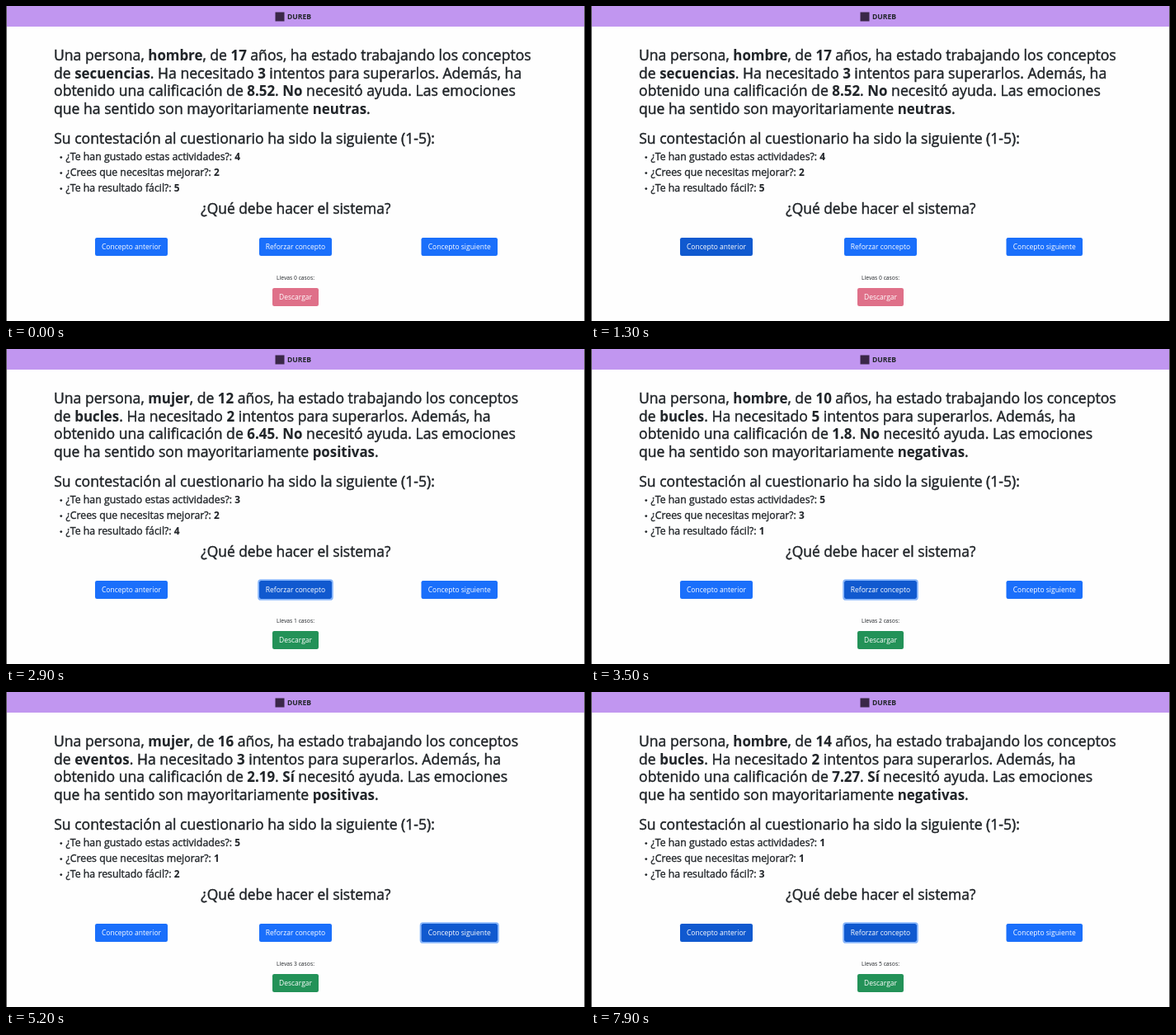
These frames come from a looping animation (702 px wide and 382 px high, 8 s). An HTML page:

```html
<!DOCTYPE html>
<html lang="es">
<head>
<meta charset="utf-8">
<style>
  html, body { margin: 0; width: 100%; height: 100%; overflow: hidden; background: #fefefe; }
  svg { display: block; width: 702px; height: 382px; }
  text { font-family: "Open Sans", "Noto Sans", sans-serif; fill: #212529; white-space: pre; }
  .big { font-size: 17.6px; stroke: #212529; stroke-width: .45px; }
  .item { font-size: 12.3px; stroke: #212529; stroke-width: .35px; }
  .bold { font-weight: 700; font-size: .96em; stroke-width: .1px; }
  .label { font-size: 8.5px; fill: #fff; text-anchor: middle; }
  .mid { text-anchor: middle; }
</style>
</head>
<body>
<svg viewBox="0 0 702 382">
  <rect width="702" height="382" fill="#fefefe"/>
  <rect width="702" height="25" fill="#c196f0"/>
  <path d="M.5 0V382M701.5 0V382" stroke="#555"/>
  <rect x="326.5" y="7.5" width="11" height="11" fill="#3a2748"/>
  <text x="341" y="16" font-size="8.6" font-weight="700">DUREB</text>
  <g id="story"></g>
  <text class="big mid" x="351.3" y="252" style="font-size: 17.4px">¿Qué debe hacer el sistema?</text>
  <g id="buttons"></g>
  <text id="count" class="mid" x="351" y="332.3" font-size="6.75"></text>
  <rect id="save" x="323" y="342" width="56" height="22" rx="2.2"/>
  <text class="label" x="351" y="356.2">Descargar</text>
</svg>
<script>
const LOOP = 8000, FADE = 150;
const $ = id => document.getElementById(id);

// start time, gender, age, concept, attempts, mark, help, emotions, answers
const cases = [
  [0, 'hombre', 17, 'secuencias', 3, 8.52, 'No', 'neutras', [4, 2, 5]],
  [2600, 'mujer', 12, 'bucles', 2, 6.45, 'No', 'positivas', [3, 2, 4]],
  [3200, 'hombre', 10, 'bucles', 5, 1.8, 'No', 'negativas', [5, 3, 1]],
  [4700, 'mujer', 16, 'eventos', 3, 2.19, 'Sí', 'positivas', [5, 1, 2]],
  [5800, 'hombre', 8, 'eventos', 1, 5.81, 'Sí', 'negativas', [3, 1, 2]],
  [7100, 'hombre', 14, 'bucles', 2, 7.27, 'Sí', 'negativas', [1, 1, 3]]
];
const questions = ['¿Te han gustado estas actividades?', '¿Crees que necesitas mejorar?', '¿Te ha resultado fácil?'];

// spans of [from, to] in ms: dark = hovered or focused, ring = focused
const buttons = [
  { name: 'Concepto anterior', x: 108, w: 88, dark: [[1100, 1700], [7600, LOOP]], ring: [] },
  { name: 'Reforzar concepto', x: 307, w: 88, dark: [[1900, 4700], [6450, LOOP]], ring: [[2600, 4700], [7100, LOOP]] },
  { name: 'Concepto siguiente', x: 503.5, w: 92.5, dark: [[4400, 7100]], ring: [[4700, 7100]] }
];
const blue = [26, 111, 251], navy = [16, 89, 207], pink = [223, 112, 137], green = [35, 146, 88];

const bold = s => `<tspan class="bold">${s}</tspan>`;
const line = (cls, x, y, s) => `<text class="${cls}" x="${x}" y="${y}">${s}</text>`;
const clamp = v => Math.max(0, Math.min(1, v));
const mix = (a, b, k) => `rgb(${a.map((v, i) => Math.round(v + (b[i] - v) * k))})`;
const level = (spans, t) => Math.max(0, ...spans.map(([from, to]) =>
  Math.min(clamp((t - from) / FADE), to === LOOP ? 1 : 1 - clamp((t - to) / FADE))));

function story([, gender, age, concept, tries, mark, help, mood, answers]) {
  const lines = [
    `Una persona, ${bold(gender)}, de ${bold(age)} años, ha estado trabajando los conceptos`,
    `de ${bold(concept)}. Ha necesitado ${bold(tries)} intento${tries > 1 ? 's' : ''} para superarlos. Además, ha`,
    `obtenido una calificación de ${bold(mark)}. ${bold(help)} necesitó ayuda. Las emociones`,
    `que ha sentido son mayoritariamente ${bold(mood)}.`
  ];
  return lines.map((s, i) => line('big', 58, 66 + 21.6 * i, s)).join('') +
    line('big', 58.2, 166.7, 'Su contestación al cuestionario ha sido la siguiente (1-5):') +
    questions.map((q, i) => `<circle cx="66.8" cy="${183.6 + 19 * i}" r="1.4" fill="#212529"/>` +
      line('item', 72.5, 186.5 + 19 * i, `${q}: ${bold(answers[i])}`)).join('');
}

$('buttons').innerHTML = buttons.map(({ name, x, w }) =>
  `<rect x="${x - .9}" y="280.1" width="${w + 1.8}" height="23.8" rx="3" fill="none" stroke="#86b5fb" stroke-width="1.8"/>
   <rect x="${x}" y="281" width="${w}" height="22" rx="2.2"/>` +
  line('label', x + w / 2, 295.1, name)).join('');
const rects = [...$('buttons').querySelectorAll('rect')];

let shown = -1;
function draw() {
  const t = performance.now() % LOOP;
  const n = cases.filter(c => c[0] <= t).length - 1;
  if (n !== shown) {
    shown = n;
    $('story').innerHTML = story(cases[n]);
    $('count').textContent = `Llevas ${n} casos:`;
  }
  buttons.forEach(({ dark, ring }, i) => {
    rects[2 * i].setAttribute('opacity', level(ring, t));
    rects[2 * i + 1].setAttribute('fill', mix(blue, navy, level(dark, t)));
  });
  $('save').setAttribute('fill', mix(pink, green, clamp((t - cases[1][0]) / FADE)));
  requestAnimationFrame(draw);
}
draw();
</script>
</body>
</html>
```
